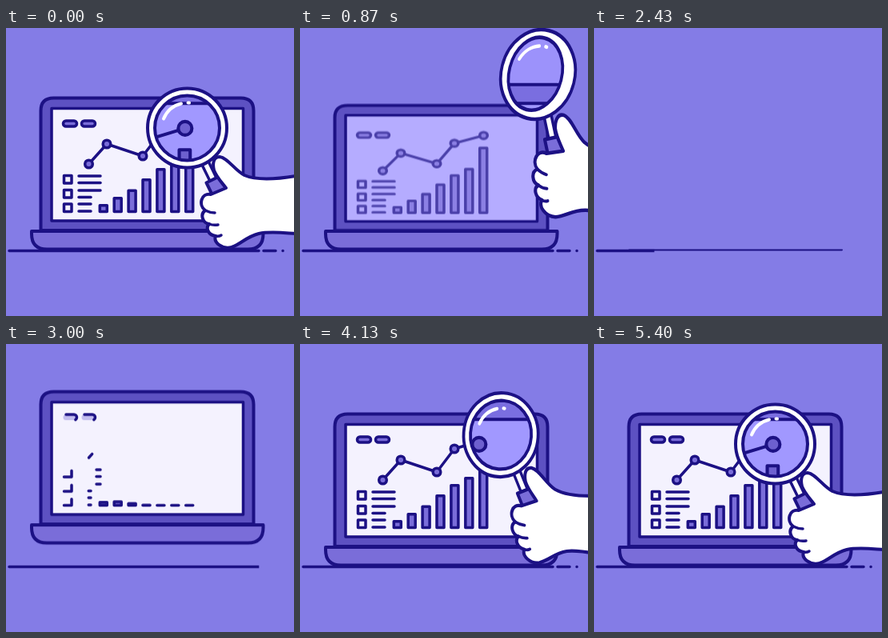
Recreate the animation shown at these times as an HTML page. Size 360 by 360 pixels, loop 5.43 s.

```html
<!DOCTYPE html>
<html lang="en">
<head>
<meta charset="utf-8">
<title>Laptop and magnifier</title>
<style>
html, body { margin: 0; width: 100%; height: 100%; overflow: hidden; background: #847ce6; }
svg { display: block; width: 100vw; height: 100vh; }
svg * { stroke-linecap: round; stroke-linejoin: round; }
.ink { stroke: #1c1184; stroke-width: 4; fill: none; }
.thin { stroke-width: 3.5; }
.white { fill: #fff; }
.soft { fill: #7a6dd9; }
.lid { fill: #5d51c2; }
.screen { fill: #f4f2fe; }
.shine { fill: none; stroke: #fff; stroke-width: 4; }
.bar { height: var(--h); y: calc(229.5px - var(--h)); }
.zoom .ink { stroke-width: 2.7; }
.zoom .lid { fill: #7a6ee0; }
.zoom .screen { fill: #a198ff; }
.zoom .soft { fill: #6d60cf; }
.zoom .dot { r: 5.6px; }
.lidbox { transform-origin: 0 253px; }
.live { transform-origin: 0 231px; }
.live .dot { transform-box: fill-box; transform-origin: center; }
.live .box, .live .text, .live .trend { stroke-dasharray: 1 1; }
</style>
</head>
<body>
<svg viewBox="0 0 360 360">
  <defs>
    <clipPath id="reach"><rect class="sweep" x="0" y="270" width="352" height="16"/></clipPath>
    <clipPath id="glass"><ellipse class="peek" rx="40.5" ry="40.5"/></clipPath>
  </defs>

  <g class="laptop">
    <g class="lidbox">
      <path class="ink lid" d="M43.5 253V103.500Q43.5 87.500 59.5 87.500H293.5Q309.500 87.500 309.500 103.500V253Z"/>
      <rect class="ink thin screen panel" x="57" y="100.500" width="239.500" height="140.500"/>
      <g class="live chart"></g>
    </g>
    <path class="ink soft base"/>
  </g>

  <g clip-path="url(#reach)">
    <path class="ink thin" d="M4 278.500H316M322 278.500H337M346 278.500h.1"/>
  </g>

  <g class="grip">
    <rect class="ink thin white" x="-3.500" y="46" width="9" height="28"/>
    <rect class="ink soft" x="-8.500" y="72" width="20" height="21"/>
    <g transform="rotate(26) translate(-226.500 -125)">
      <path class="ink white" d="M600 185H362C338 189 314 191 298 184C286 178 277 162 267 161
        C259 161 258 170 260 178C263 186 268 191 275 200L256 208C244 206 240 221 249 228
        C242 233 246 244 254 245C249 250 253 259 262 260C259 268 270 277 282 274
        C294 270 300 261 316 257C330 254 346 256 362 257H600Z"/>
      <path class="ink thin" d="M249 228Q255 231 261 231M254 245Q259 247 265 246M262 260Q266 261 269 259"/>
    </g>
  </g>
  <g class="lens"><ellipse class="ink white" rx="49.5" ry="49.5"/></g>

  <g clip-path="url(#glass)">
    <rect width="360" height="360" fill="#9c92fb"/>
    <g class="zoom" transform="translate(-125 -57) scale(1.52)">
      <path class="ink lid" d="M44 253V100Q44 84 60 84H293Q309 84 309 100V253Z"/>
      <rect class="ink screen" x="57" y="99.500" width="240" height="141.500"/>
      <g class="chart"></g>
    </g>
  </g>

  <g class="lens">
    <ellipse class="ink rim" rx="40.5" ry="40.5"/>
    <path class="shine" d="M-29.500 -11.500A32 32 0 0 1 -7.500 -30.500M1 -31.500L2.500 -31.400"/>
  </g>
</svg>

<script>
const LOOP = 5430;
const sheet = [];

// Keyframes written in milliseconds: [time, rules, easing to the next one]
function key(name, steps) {
  const body = steps.map(([ms, rules, ease = 'linear']) =>
    `${ms / LOOP * 100}%{${rules};animation-timing-function:${ease}}`).join('');
  sheet.push(`@keyframes ${name}{${body}}`);
}
function run(sel, ...names) {
  sheet.push(`${sel}{animation:${names.map(n => `${n} ${LOOP}ms infinite backwards`).join()}}`);
}

// Chart, drawn on the screen and again inside the lens
const tops = [220, 211, 201.5, 188, 175, 166, 136];
const dots = [[103.5, 170], [126, 145], [171, 160], [193, 131], [229.5, 120]];
const chart = [
  ...[71.5, 94.5].map(x => `<rect class="ink thin soft box" pathLength="1" x="${x}" y="116" width="17" height="7" rx="3.5"/>`),
  ...[194, 212, 229.5].map(y => `<path class="ink thin box" pathLength="1" d="M72.5 ${y}h9.5v-9.5h-9.5z"/>`),
  ...[185, 193.5, 203, 211.5, 220, 229].map((y, i) =>
    `<path class="ink thin text" pathLength="1" d="M${i < 3 ? 118 : 106} ${y}H91"/>`),
  ...tops.map((top, i) => `<rect class="ink thin soft bar" x="${117.3 + i * 17.9}" width="9"
    style="--h:${227.8 - top}px;animation-delay:${i * 40}ms"/>`),
  `<polyline class="ink thin trend" pathLength="1" points="${dots.join(' ')}"/>`,
  ...dots.map(([x, y], i) => `<circle class="ink thin soft dot" cx="${x}" cy="${y}" r="4.8"
    style="animation-delay:${i * 60}ms"/>`)
].join('');
document.querySelectorAll('.chart').forEach(g => g.innerHTML = chart);

// Lens and hand share a path and turn; each is foreshortened in its own frame
// [time, x, y, turn, lens scale, hand scale, easing]
const moves = [
  [0, 226.5, 125, 0, '1 1', '1 1', 'cubic-bezier(.5,0,.75,.6)'],
  [570, 264, 107, 6, '.98 1.06', '1 1.05'],
  [870, 297.5, 58, 14, '.93 1.14', '1.02 1.13', 'ease-in'],
  [1120, 470, 50, 20, '.9 1.14', '1 1.12', 'step-end'],
  [1130, 500, 125, 14, '.94 1.1', '.95 1.1'],
  [3400, 500, 125, 14, '.94 1.1', '.95 1.1', 'ease-out'],
  [3850, 286, 75, 9, '.93 1.12', '.95 1.1', 'ease-in-out'],
  [4130, 251.3, 113.5, 4, '.94 1.06', '.97 1.05'],
  [4415, 195, 136, 0, '.99 1.01', '.99 1.01', 'ease-out'],
  [4970, 127, 137, -2, '1 1', '1 1', 'ease-in-out'],
  [5400, 226.5, 125, 0, '1 1', '1 1'],
  [5430, 226.5, 125, 0, '1 1', '1 1']
];
const pose = (x, y, turn, scale) => `translate:${x}px ${y}px;rotate:${turn}deg;scale:${scale}`;
key('lens', moves.map(([ms, x, y, turn, lens, , ease]) => [ms, pose(x, y, turn, lens), ease]));
key('grip', moves.map(([ms, x, y, turn, , hand, ease]) => [ms, pose(x, y, turn - 26, hand), ease]));

const hole = (rx, cx) => `rx:${rx}px;cx:${cx}px`;
key('hole', [
  [0, hole(40.5, 0)], [400, hole(40.5, 0)], [870, hole(35.5, -3.5)],
  [3850, hole(36.5, -2.5)], [4130, hole(40.5, 0)], [5430, hole(40.5, 0)]
]);
run('.lens', 'lens');
run('.grip', 'grip');
run('.rim', 'hole');
run('.peek', 'lens', 'hole');

// Laptop hop, lid and base
const lift = y => `transform:translateY(${y}px)`;
key('hop', [
  [0, lift(0)], [2650, lift(0), 'cubic-bezier(.33,.67,.67,1)'],
  [2870, lift(-43), 'cubic-bezier(.33,0,.67,.33)'],
  [3090, lift(0)], [5430, lift(0)]
]);
run('.laptop', 'hop');

const tall = k => `transform:scaleY(${k})`;
key('lid', [
  [0, tall(1)], [560, tall(1), 'ease-in'],
  [870, tall(.945), 'cubic-bezier(.4,.15,.8,.7)'],
  [1130, tall(.37)], [1230, tall(0)],
  [2500, tall(0), 'ease-out'], [2690, tall(1)], [3090, tall(1), 'ease-out'],
  [3190, tall(.96), 'ease-in-out'], [3360, tall(1.015), 'ease-in-out'],
  [3560, tall(1)], [5430, tall(1)]
]);
run('.lidbox', 'lid');

function slab(t, b, topR, lowR, l = 32, r = 321.5) {
  return `d:path("M${l + topR} ${t}L${r - topR} ${t}Q${r} ${t} ${r} ${t + topR}L${r} ${b - lowR}` +
    `Q${r} ${b} ${r - lowR} ${b}L${l + lowR} ${b}Q${l} ${b} ${l} ${b - lowR}L${l} ${t + topR}` +
    `Q${l} ${t} ${l + topR} ${t}Z")`;
}
const open = slab(254, 276.5, 0, 19) + ';stroke-width:4px;opacity:1';
const shut = slab(251, 276, 19, 0) + ';stroke-width:4px;opacity:1';
const flat = slab(277.5, 277.5, 0, 0, 44, 310) + ';stroke-width:1.8px;opacity:';
key('base', [
  [0, open], [1150, open, 'ease-in-out'], [1390, shut], [1450, shut, 'ease-in'],
  [1690, flat + 1, 'step-end'], [1700, flat + 0], [2300, flat + 0],
  [2400, flat + 1], [2430, flat + 1, 'ease-out'], [2620, open], [5430, open]
]);
run('.base', 'base');

const slide = x => `transform:translateX(${x}px)`;
key('sweep', [
  [0, slide(0)], [1480, slide(0), 'ease-in'], [1700, slide(48)],
  [2000, slide(352), 'step-end'], [2010, slide(-352)],
  [2160, slide(-352), 'cubic-bezier(.3,.1,.7,.6)'], [2430, slide(-277)],
  [3000, slide(-36), 'ease-out'], [3220, slide(0)], [5430, slide(0)]
]);
run('.sweep', 'sweep');

// Screen content: dims with the closing lid, then draws itself again
key('panel', [
  [0, 'fill:#f4f2fe'], [480, 'fill:#f4f2fe'], [870, 'fill:#b5acff'],
  [1300, 'fill:#a198ff', 'step-end'], [1310, 'fill:#f4f2fe'], [5430, 'fill:#f4f2fe']
]);
run('.panel', 'panel');

const view = (k, o) => `transform:scaleY(${k});opacity:${o}`;
key('live', [
  [0, view(1, 1)], [520, view(1, 1), 'ease-in'], [870, view(.935, .7)],
  [1230, view(.7, .4), 'step-end'], [1310, view(1, 0)],
  [2800, view(1, 0), 'step-end'], [2880, view(1, 1)], [5430, view(1, 1)]
]);
run('.live', 'live');

// Stays full until the lid is shut, then goes from empty at `from` to full at `to`
function build(name, empty, full, from, to, ease, mid = []) {
  key(name, [[0, full], [1300, full, 'step-end'], [1310, empty],
    [from, empty, ease], ...mid, [to, full], [5430, full]]);
  run(`.live .${name}`, name);
}
const trim = (k, o) => `stroke-dashoffset:${k};opacity:${o}`;
build('box', trim(1, 0) + ';fill-opacity:0', trim(0, 1) + ';fill-opacity:1', 2900, 3260, 'ease-out',
  [[3000, trim(.55, 1) + ';fill-opacity:.4']]);
build('text', trim(1, 0), trim(0, 1), 2920, 3350, 'linear', [[3000, trim(.82, 1), 'ease-out']]);
build('trend', trim(1, 0), trim(0, 1), 2940, 3600, 'linear', [[3000, trim(.96, 1), 'ease-in-out']]);
build('bar', 'height:.1px;y:229.4px', 'height:var(--h);y:calc(229.5px - var(--h))', 2880, 3320, 'ease');
build('dot', 'transform:scale(0)', 'transform:scale(1)', 3040, 3320, 'cubic-bezier(.3,1.4,.6,1)');

document.head.appendChild(document.createElement('style')).textContent = sheet.join('\n');
</script>
</body>
</html>
```
